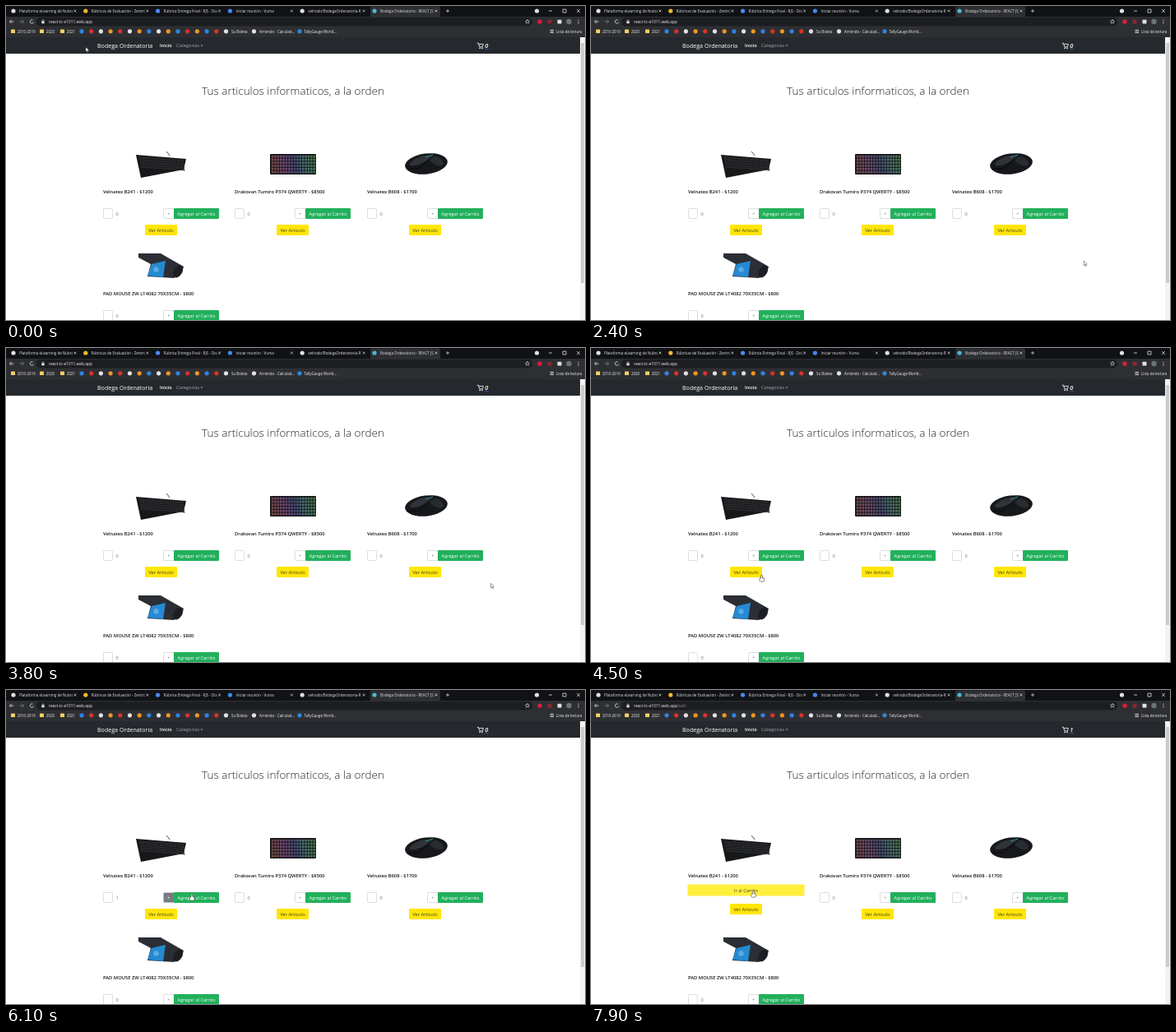
Write an HTML page with a canvas that moves like this. It is 704 px wide and 382 px high and loops after 8000 ms.

```html
<!DOCTYPE html>
<html lang="es">
<head>
<meta charset="utf-8">
<title>Bodega Ordenatoria</title>
<style>
html, body { margin: 0; width: 100%; height: 100%; overflow: hidden; background: #fff; }
canvas { display: block; width: 100vw; height: 100vh; }
</style>
</head>
<body>
<canvas id="stage" width="704" height="382"></canvas>
<script>
const ctx = document.getElementById('stage').getContext('2d');
const LOOP = 8000, STEP = 100;
const SANS = '"Open Sans", "Noto Sans", sans-serif';
const YELLOW = '#ffe608', GREEN = '#22b05c', INK = '#212529', BAR = '#2e2f33', PALE = '#e0e1e3';
const COUNT_AT = 5100, ADD_AT = 6200, PRESS_AT = 7600, URL_AT = 7700;

// Each move eases the pointer to a place and then rests there.
const HOME = { x: 97, y: 50 };
const MOVES = [
  { at: 0, ms: 600, x: 22, y: 101 },
  { at: 700, ms: 800, x: 32, y: 98 },
  { at: 1500, ms: 400, x: 15, y: 113 },
  { at: 2000, ms: 500, x: 667, y: 333 },
  { at: 2700, ms: 200, x: 697, y: 320 },
  { at: 3200, ms: 300, x: 694.5, y: 289 },
  { at: 3500, ms: 1000, x: 207.5, y: 276 },
  { at: 4500, ms: 400, x: 198, y: 252 },
  { at: 5100, ms: 400, x: 226, y: 248 },
  { at: 6800, ms: 600, x: 197.5, y: 244 }
];

const PRODUCTS = [
  ['Velnatex B241 - $1200', keyboard],
  ['Drakovan Tumiro P374 QWERTY - $8500', compactKeyboard],
  ['Velnatex B608 - $1700', mouse],
  ['PAD MOUSE ZW LT4082 70X35CM - $800', mousePad]
].map(([name, art], i) => ({
  name, art, first: i === 0,
  x: Math.round(118 + 160.3 * (i % 3)),
  y: 124 * Math.floor(i / 3)
}));

function rect(x, y, w, h, fill) {
  ctx.fillStyle = fill;
  ctx.fillRect(x, y, w, h);
}

function round(x, y, w, h, r, fill, stroke, width = 0.6) {
  ctx.beginPath();
  ctx.roundRect(x, y, w, h, r);
  if (fill) { ctx.fillStyle = fill; ctx.fill(); }
  if (stroke) { ctx.strokeStyle = stroke; ctx.lineWidth = width; ctx.stroke(); }
}

function oval(x, y, rx, ry, tilt, fill) {
  ctx.beginPath();
  ctx.ellipse(x, y, rx, ry, tilt, 0, Math.PI * 2);
  ctx.fillStyle = fill;
  ctx.fill();
}

function dot(x, y, r, fill) {
  oval(x, y, r, r, 0, fill);
}

function trace(points) {
  ctx.beginPath();
  for (let i = 0; i < points.length; i += 2) ctx.lineTo(points[i], points[i + 1]);
}

function poly(points, fill) {
  trace(points);
  ctx.closePath();
  ctx.fillStyle = fill;
  ctx.fill();
}

function line(points, color, width = 0.8) {
  trace(points);
  ctx.strokeStyle = color;
  ctx.lineWidth = width;
  ctx.stroke();
}

function text(str, x, y, size, color, weight = '400', align = 'left') {
  ctx.font = `${weight} ${size}px ${SANS}`;
  ctx.textAlign = align;
  ctx.fillStyle = color;
  ctx.fillText(str, x, y);
}

function cross(x, y, r, color) {
  line([x - r, y - r, x + r, y + r], color, 0.7);
  line([x - r, y + r, x + r, y - r], color, 0.7);
}

function plus(x, y, r, color) {
  line([x - r, y, x + r, y], color, 0.7);
  line([x, y - r, x, y + r], color, 0.7);
}

function navArrow(x, dir, color) {
  line([x - dir * 2.5, 19, x + dir * 2.5, 19], color);
  line([x + dir * 0.3, 16.8, x + dir * 2.5, 19, x + dir * 0.3, 21.2], color);
}

function tabs() {
  rect(0, 0, 704, 13, '#111215');
  round(443, 0.5, 85, 14, 2, BAR);
  const items = [
    ['Plataforma eLearning de Nubra', PALE],
    ['Rúbricas de Evaluación - Zentro', '#f4b92f'],
    ['Rúbrica Entrega Final - RJS - Doc', '#4a8af4'],
    ['Iniciar reunión - Vuma', '#3d8bf2'],
    ['velnodo/BodegaOrdenatoria-R', PALE],
    ['Bodega Ordenatoria - REACT JS', '#4fb7d8']
  ];
  items.forEach(([label, color], i) => {
    const x = 3 + i * 87.8;
    dot(x + 6, 6, 2.6, color);
    ctx.save();
    ctx.beginPath();
    ctx.rect(x + 13, 0, 65, 13);
    ctx.clip();
    text(label, x + 13, 7.8, 4.5, PALE);
    ctx.restore();
    cross(x + 81, 6, 1.4, PALE);
  });
  plus(537, 6, 2, PALE);
  dot(645.5, 6, 2.6, PALE);
  line([660, 6, 664, 6], PALE);
  round(677, 4, 4, 4, 0, null, PALE, 0.8);
  cross(696, 6, 2, PALE);
}

function addressBar(t) {
  rect(0, 13, 704, 25, BAR);
  round(37, 14, 603, 10.5, 5, '#1d1e21');
  navArrow(7, -1, PALE);
  navArrow(19, 1, '#85868a');
  ctx.beginPath();
  ctx.arc(31.5, 19, 2.2, 0.3, 5.3);
  ctx.strokeStyle = PALE;
  ctx.stroke();
  round(43.3, 18.5, 3.4, 2.8, 0.4, PALE);
  round(44, 16.8, 2, 3, 1, null, PALE);

  const host = 'react-tc-e1011.web.app';
  text(host, 52, 20.8, 4.85, '#f1f1f2');
  if (t >= URL_AT) text('/cart', 52 + ctx.measureText(host).width, 20.8, 4.85, '#96989c');

  const star = [];
  for (let i = 0; i < 11; i++) {
    const a = i * Math.PI / 5 - Math.PI / 2, r = i % 2 ? 1.2 : 2.7;
    star.push(634 + r * Math.cos(a), 19 + r * Math.sin(a));
  }
  line(star, PALE, 0.6);
  ['#d8203c', '#8f2430', PALE].forEach((c, i) => round(646.5 + i * 12, 16.8, 5, 4.6, 0.6, c));
  dot(684.5, 19, 3.2, '#68757a');
  for (let i = -1; i < 2; i++) dot(696, 19 + i * 1.9, 0.6, PALE);
}

function bookmarks() {
  const label = (str, x) => text(str, x, 32.6, 4.45, '#f0f0f1', '500');
  [['2010-2019', 6], ['2020', 41], ['2021', 66]].forEach(([name, x]) => {
    round(x, 28.6, 5, 4.4, 0.5, '#f3cf62');
    label(name, x + 8);
  });
  const tints = ['#2f83e4', '#d9342b', PALE, '#ef9624'];
  for (let i = 0; i < 16; i++) dot(92 + i * 11.7, 30.8, 2.6, tints[(i * 5 + (i >> 2)) % 4]);
  label('Su Boleta', 274);
  dot(301.5, 30.8, 2.6, PALE);
  label('Arriendo - Calculad...', 308);
  dot(357, 30.8, 2.6, '#2d87dd');
  label('TallyGauge World...', 362.5);
  for (let i = 0; i < 3; i++) rect(661.5, 28.8 + i * 1.7, 4.5, 0.8, PALE);
  label('Lista de lectura', 669);
}

function navbar(t) {
  rect(0, 38, 698, 20, '#25292d');
  text('Bodega Ordenatoria', 111, 51, 7.1, '#fff', '500');
  text('Inicio', 187, 50.4, 5.7, '#fff', '600');
  text('Categorias', 207, 50.4, 5.7, '#a2a5a8');
  poly([236.5, 47.6, 239.5, 47.6, 238, 49.3], '#a2a5a8');
  line([572.8, 45.2, 574.4, 45.2, 575.8, 49.8, 579.4, 49.8, 580.4, 46.4, 574.8, 46.4], '#fff');
  dot(576.2, 51.4, 0.8, '#fff');
  dot(579, 51.4, 0.8, '#fff');
  text(t >= ADD_AT ? '1' : '0', 582.3, 51.2, 7.4, '#fff', 'italic 600');
  rect(582, 52, 5, 0.6, '#2d6fd0');
}

// Keys on a grid spanned by two edge vectors.
function keys(x, y, across, down, cols, rows, tint) {
  ctx.save();
  ctx.transform(across[0] / cols, across[1] / cols, down[0] / rows, down[1] / rows, x, y);
  for (let r = 0; r < rows; r++) {
    for (let c = 0; c < cols; c++) rect(c + 0.1, r + 0.1, 0.75, 0.72, tint(c / cols, r / rows));
  }
  ctx.restore();
}

function keyboard() {
  line([199, 182, 197, 179, 195, 177], '#222');
  poly([158, 181, 219, 186, 216, 199, 164, 209], '#17181a');
  keys(162, 183, [54, 4], [2, 14], 18, 5, () => '#2d2e31');
}

function compactKeyboard() {
  round(321, 180, 56, 25, 1, '#1a1a1d');
  keys(322.5, 181.5, [54, 0], [0, 22.5], 16, 6,
    (u, v) => `hsl(${350 - 250 * u + 30 * v}, 24%, 38%)`);
}

function mouse() {
  oval(511, 192, 26, 12.5, -0.12, '#17181b');
  oval(503, 188, 13, 4, -0.4, '#303338');
  oval(523, 188, 10, 5, 0.5, '#282b2f');
  line([488, 198, 501, 198, 522, 181], '#080809', 1);
  line([510, 184, 519, 181], '#2a9cab', 0.9);
}

function mousePad() {
  poly([161, 301, 188, 301, 216, 317, 214, 325, 204, 331, 172, 329, 176, 314, 161, 306], '#2b2e35');
  oval(209, 323, 5, 8, 0.5, '#1c1e22');
  poly([177, 314, 194, 310, 191, 330, 172, 328], '#258ad2');
  dot(182.5, 320.5, 3.2, '#59abe3');
}

// Clickable boxes of a card, which grow shorter once the item is in the cart.
function boxes({ x, y, first }, t) {
  const added = first && t >= ADD_AT;
  return {
    added,
    action: added ? [x, y + 237, 141, 13] : [x + 73, y + 246, 68, 13],
    detail: [x + 51, y + (added ? 260 : 266), 39, 13]
  };
}

function inside(tip, [x, y, w, h]) {
  return tip.x >= x && tip.x <= x + w && tip.y >= y && tip.y <= y + h;
}

function button(label, [x, y, w, h], fill, color = '#3f3d25') {
  round(x, y, w, h, 1.2, fill);
  text(label, x + w / 2, y + 8.5, 5.6, color, '400', 'center');
}

function card(p, t, tip) {
  const { name, art, first, x, y } = p, { added, action, detail } = boxes(p, t);
  art();
  text(name, x, y + 228.4, 5.8, '#16181b', '600');
  if (added) {
    if (t >= PRESS_AT) round(x - 1, y + 236, 143, 15, 2, '#fff6a0');
    button('Ir al Carrito', action, inside(tip, action) ? '#fff03c' : YELLOW);
  } else {
    const active = first && t >= 4800;
    round(x + 0.5, y + 246.5, 11, 12, 1, '#fff', '#c4c8cc');
    text(first && t >= COUNT_AT ? '1' : '0', x + 15.5, y + 254.6, 5.6, '#6c757d');
    round(x + 73.5, y + 246.5, 13, 12, 1, active ? '#767c82' : '#fff', '#c4c8cc');
    plus(x + 79.7, y + 252.6, 0.9, active ? '#fff' : '#8c9196');
    button('Agregar al Carrito', [x + 86, y + 246, 55, 13], GREEN, '#fff');
  }
  button('Ver Articulo', detail, YELLOW);
}

function pointerAt(t) {
  return MOVES.reduce((p, m) => {
    const u = Math.min(1, Math.max(0, (t - m.at) / m.ms)), e = u * u * (3 - 2 * u);
    return { x: p.x + (m.x - p.x) * e, y: p.y + (m.y - p.y) * e };
  }, HOME);
}

function pointer({ x, y }, hand) {
  const edge = '#3a3c40';
  ctx.save();
  ctx.translate(x, y);
  if (hand) {
    round(-2.6, 3.2, 5.6, 5, 1.6, '#fff', edge);
    round(-0.9, 0, 1.8, 5, 0.9, '#fff', edge);
    rect(-0.6, 3, 1.2, 3, '#fff');
  } else {
    const arrow = [0, 0, 0, 5.6, 1.4, 4.5, 2.3, 6.6, 3.1, 6.2, 2.3, 4.2, 4, 4, 0, 0];
    poly(arrow, '#fff');
    line(arrow, edge, 0.55);
  }
  ctx.restore();
}

function draw(t) {
  const tip = pointerAt(t);
  rect(0, 0, 704, 382, '#fff');
  tabs();
  addressBar(t);
  bookmarks();
  navbar(t);
  rect(698, 38, 6, 344, '#f3f3f3');
  rect(699, 45, 4, 292, '#cbcbcb');
  text('Tus articulos informaticos, a la orden', 349, 108, 13.5, INK, '300', 'center');
  PRODUCTS.forEach(p => card(p, t, tip));
  const hand = PRODUCTS.some(p => {
    const { action, detail } = boxes(p, t);
    return inside(tip, action) || inside(tip, detail);
  });
  pointer(tip, hand);
}

const start = performance.now();
function tick() {
  const t = (performance.now() - start) % LOOP;
  draw(Math.floor(t / STEP) * STEP);
  requestAnimationFrame(tick);
}
tick();
</script>
</body>
</html>
```
